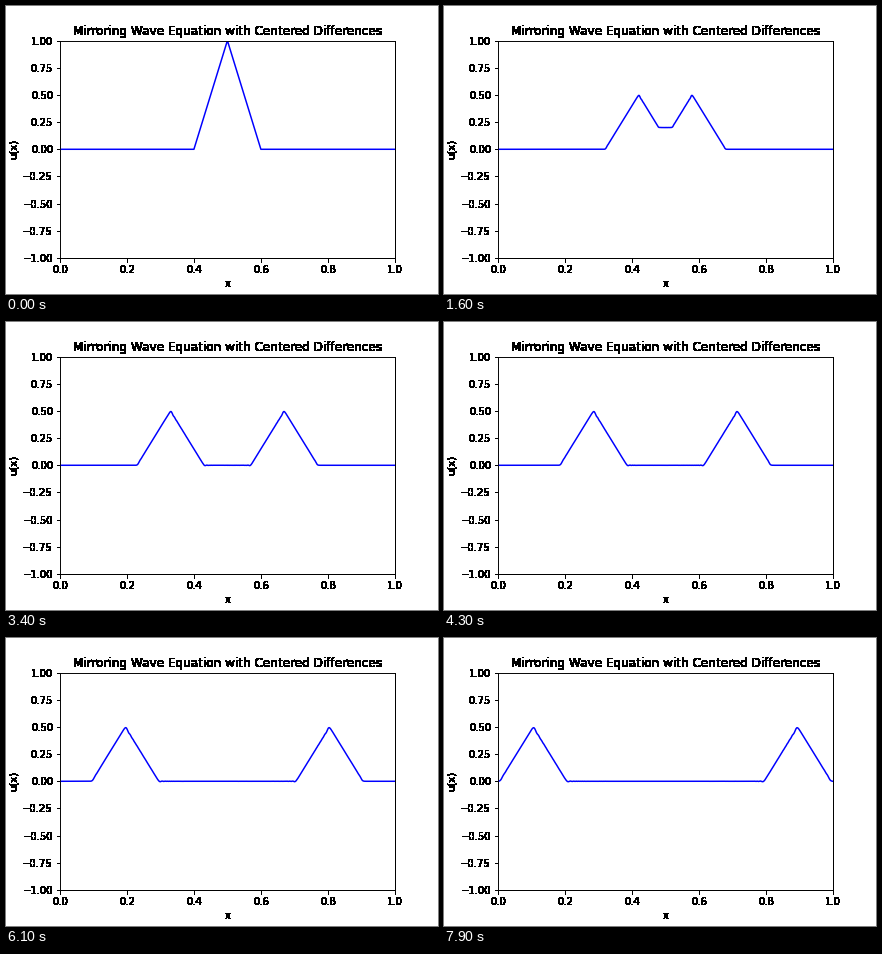
Animation of 432x288 px, one loop 8000 ms. Source, as a matplotlib script:

```python
import matplotlib.pyplot as plt
import numpy as np
from matplotlib.animation import FuncAnimation

FRAMES = 80
STEPS_PER_FRAME = 10
DX = 0.001
DT = 0.0005


def solve(u):
    """Centered-difference solution of u_tt = u_xx with fixed ends, at rest at t = 0."""
    r2 = (DT / DX) ** 2

    def laplacian(v):
        out = np.zeros_like(v)
        out[1:-1] = v[2:] - 2 * v[1:-1] + v[:-2]
        return out

    prev = u + 0.5 * r2 * laplacian(u)
    states = [u]
    for _ in range(FRAMES - 1):
        for _ in range(STEPS_PER_FRAME):
            prev, u = u, 2 * u - prev + r2 * laplacian(u)
        states.append(u)
    return states


def bake_labels(fig, ax):
    """Render the static axes once with hard, alpha-free edges and use it as backdrop."""
    fig.patch.set_alpha(0)
    fig.canvas.draw()
    backdrop = np.asarray(fig.canvas.buffer_rgba())[..., :3].copy()
    fig.patch.set_alpha(1)
    fig.figimage(backdrop, zorder=-1)
    ax.patch.set_visible(False)
    ax.set(title="", xlabel="", ylabel="", xticks=[], yticks=[])


x = np.linspace(0, 1, round(1 / DX) + 1)
states = solve(np.clip(1 - np.abs(x - 0.5) / 0.1, 0, None))

fig, ax = plt.subplots(figsize=(6, 4), dpi=72, facecolor="white")
fig.subplots_adjust(left=0.125, right=0.9, bottom=0.125, top=0.88)
ax.set(xlim=(0, 1), ylim=(-1, 1), xlabel="x", ylabel="u(x)",
       title="Mirroring Wave Equation with Centered Differences")
bake_labels(fig, ax)
line, = ax.plot(x, states[0], color="blue", lw=1.5)
ax.set(xlim=(0, 1), ylim=(-1, 1))


def update(i):
    line.set_ydata(states[i])
    return line,


anim = FuncAnimation(fig, update, frames=FRAMES, interval=100,
                     repeat=True, repeat_delay=0)
plt.show()
```
